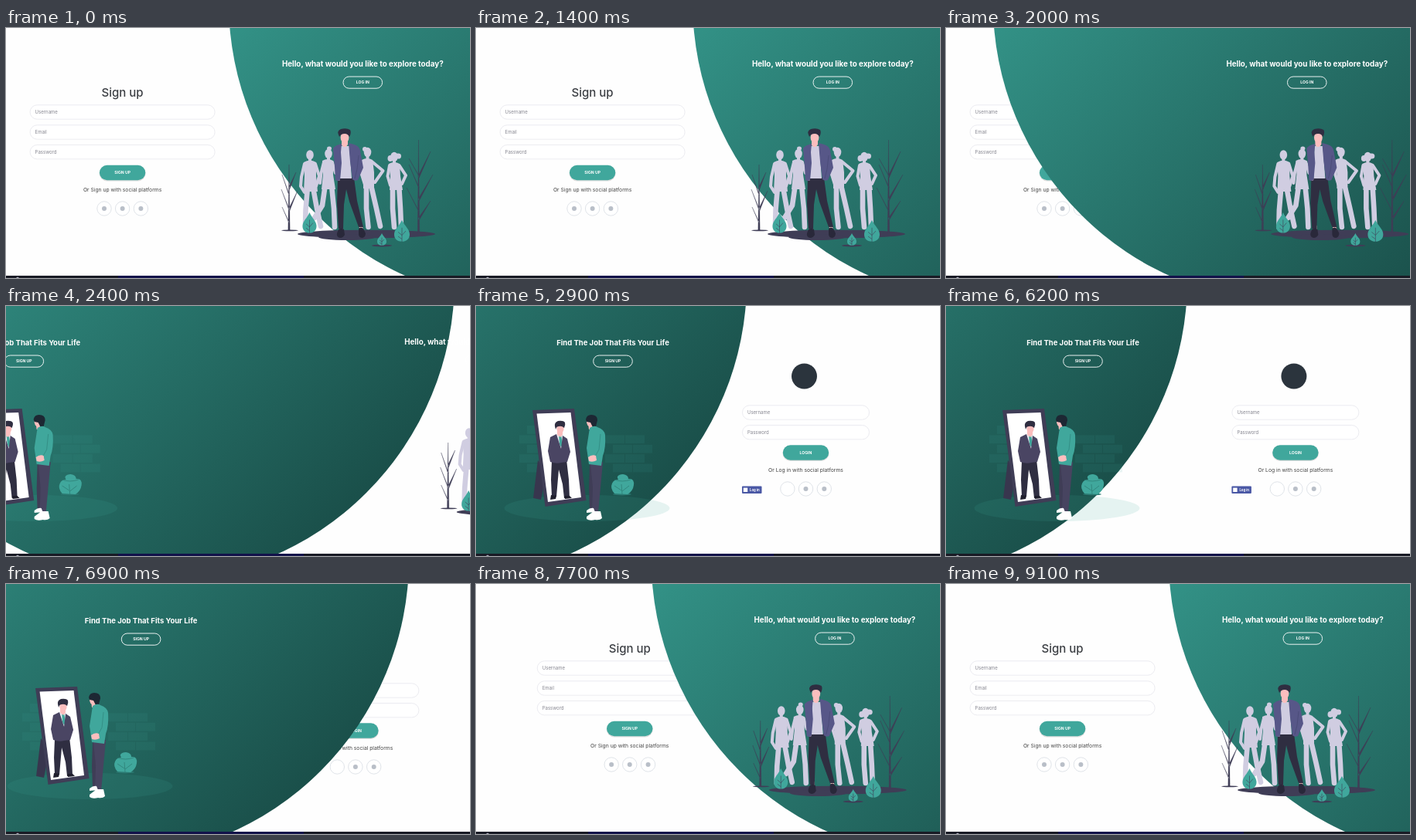
Animation of 600x324 px, one loop 9200 ms. Source, as an HTML page:

```html
<!DOCTYPE html>
<html lang="en">
<head>
<meta charset="utf-8">
<title>Sign up and log in</title>
<style>
html, body { margin: 0; width: 100%; height: 100%; overflow: hidden; background: #fefefe; }
svg { display: block; width: 100vw; height: 100vh; }
text { font-family: Inter, "Open Sans", sans-serif; }
.title { font-size: 15px; font-weight: 450; fill: #3c3f44; }
.head { font-size: 9.8px; font-weight: 700; fill: #fff; }
.btn { font-size: 5.1px; font-weight: 700; fill: #fff; }
.hint { font-size: 6px; fill: #85858f; }
.note { font-size: 6.75px; fill: #444; }
.title, .head, .btn, .note { text-anchor: middle; }
.dark { fill: #3f3d56; }
.ink { fill: #2f2e41; }
.pale { fill: #d0cde1; }
.limb { fill: none; stroke: #d0cde1; stroke-linecap: round; stroke-linejoin: round; }
.teal { fill: #40a79c; }
.skin { fill: #fbbebe; }
.white { fill: #fff; }
</style>
</head>
<body>
<svg id="stage" viewBox="0 0 600 324" preserveAspectRatio="none"></svg>
<script>
const pill = (x, y, w, h, attrs) =>
  `<rect x="${x}" y="${y}" width="${w}" height="${h}" rx="${h / 2}" ${attrs}/>`;
const oval = (x, y, rx, ry, attrs = '') =>
  `<ellipse cx="${x}" cy="${y}" rx="${rx}" ry="${ry}" ${attrs}/>`;
const path = (d, attrs = '') => `<path d="${d}" ${attrs}/>`;
const text = (x, y, cls, str, extra = '') => `<text x="${x}" y="${y}" class="${cls}" ${extra}>${str}</text>`;

// Form parts are laid out around x = 0.
const box = (y, w, id = '') =>
  pill(-w / 2, y - 9.2, w, 18.4, `fill="#fff" stroke="#ececf1" ${id}`);
const field = (y, w, label) => box(y, w) + text(6.5 - w / 2, y + 2.1, 'hint', label);
const button = (y, label) =>
  pill(-30, y - 9, 60, 20, 'fill="#000" opacity=".13"') +
  pill(-29.7, y - 9.7, 59.4, 19.4, 'class="teal"') + text(0, y + 1.6, 'btn', label);
const social = (y, marks) => [-23.6, 0, 23.8].map((x, i) =>
  oval(x, y, 9.2, 9.2, 'fill="#fff" stroke="#dce0e6" stroke-width=".9"') +
  (marks[i] ? oval(x, y, 3, 3, 'fill="#b9bfc8"') : '')).join('');
const outlined = (x, y, label) =>
  pill(x - 25.3, y - 7.6, 50.6, 15.2, 'fill="none" stroke="#fff" stroke-width=".9"') +
  text(x, y + 1.7, 'btn', label);

const signUp =
  text(0, 88.8, 'title', 'Sign up') +
  field(109, 239, 'Username') + field(135, 239, 'Email') + field(160.7, 239, 'Password') +
  button(187.5, 'SIGN UP') + text(0, 211.8, 'note', 'Or Sign up with social platforms') +
  social(234, [1, 1, 1]);

const logIn =
  oval(-2, 91, 16.5, 16.5, 'fill="#2b343d"') +
  field(138, 164, 'Username') + box(163.7, 164, 'id="pass"') +
  '<rect id="gap" x="-77.5" y="152" width="25" height="5" fill="#fefefe"/>' +
  text(-75.5, 165.8, 'hint', 'Password', 'id="label"') +
  button(190, 'LOGIN') + text(0, 214.8, 'note', 'Or Log in with social platforms') +
  social(237, [0, 1, 1]) +
  '<rect x="-82.5" y="233.6" width="25.5" height="9.4" rx="1" fill="#4a58a5"/>' +
  '<rect x="-80.7" y="235.6" width="5.4" height="5.4" fill="#fff"/>' +
  text(-66.2, 240, 'btn', 'Log in', 'style="font-size:4.3px"');

// A bare tree: slim trunk plus branches given as [tipX, tipY, rootY].
const tree = (x, top, base, branches) => path(
  `M${x - 1.2} ${base}L${x} ${top}L${x + 1.2} ${base}z` +
  branches.map(([tx, ty, ry]) => `M${tx} ${ty}L${x - .8} ${ry}L${x + .8} ${ry + 2}z`).join(''),
  'class="dark" stroke="#3f3d56" stroke-width=".3"');
const leaf = (x, top, w, h) => path(
  `M${x} ${top}C${x + w * .2} ${top + h * .3} ${x + w / 2} ${top + h * .42} ${x + w / 2} ${top + h * .67}` +
  `C${x + w / 2} ${top + h * 1.1} ${x - w / 2} ${top + h * 1.1} ${x - w / 2} ${top + h * .67}` +
  `C${x - w / 2} ${top + h * .42} ${x - w * .2} ${top + h * .3} ${x} ${top}z`, 'class="teal"') +
  path(`M${x} ${top + h * .35}V${top + h}M${x - w * .25} ${top + h * .55}L${x} ${top + h * .7}` +
  `L${x + w * .25} ${top + h * .5}M${x - w * .25} ${top + h * .75}L${x} ${top + h * .88}`,
  'fill="none" stroke="#3f3d56" stroke-width=".6"');

// A plain standing silhouette: head, torso outline, arm lines, leg lines.
const figure = (x, y, torso, arms, legs) =>
  oval(x, y, 4.8, 6.2, 'class="pale"') + path(torso, 'class="pale"') +
  path(`M${x} ${y}v10${arms}`, 'class="limb" stroke-width="4"') +
  path(legs, 'class="limb" stroke-width="6.6"');

const crowd =
  oval(466, 267, 89, 5.3, 'class="dark"') + oval(441, 271, 37, 4, 'class="dark"') +
  oval(367, 262.3, 11, .9, 'class="dark"') + oval(486, 282, 13, 1.4, 'class="dark"') +
  tree(366, 177, 262, [[357, 190, 215], [375, 187, 207], [356, 209, 234], [377, 211, 235], [357, 232, 251]]) +
  tree(533.5, 145, 265, [[549, 160, 192], [521, 177, 205], [552, 190, 222], [518, 207, 236],
    [549, 224, 247], [521, 169, 190]]) +
  figure(393, 164.5, 'M385 174q8-5 16 0l0 18 2 20h-18l1-20z',
    'M386 176L382 193 381 205 386 213M400 176L405 192 401 205',
    'M389.500 212L387.500 236 387 258M398 212L402 234 407 257') +
  oval(418, 156, 3, 2.6, 'class="pale"') +
  figure(417, 163, 'M409 172q7-4 14 0l0 18 3 19h-18l2-19z',
    'M411 174L407.500 188 406 201M422 174L426 188',
    'M412 209L409 230 399 246M421.500 209L424 234 425 258') +
  oval(464, 157, 3, 3, 'class="pale"') +
  figure(467.5, 161, 'M460 171q7-4 14 0l2 16 0 21h-14l0-20z',
    'M462 173L460 190 464 203M473 173L487.500 185 477 200',
    'M466 208L466 234 468.500 258M473 208L479 234 484 257') +
  oval(497, 169, 3.5, 4, 'class="pale"') + oval(507, 166, 4, 3.6, 'class="pale"') +
  figure(502, 167, 'M495 176q7-4 14 0l1 16 3 18h-17l1-18z',
    'M496 178L493.500 192 497 204M508.500 178L517 191 512 202',
    'M500 210L500 234 502 258M508.500 210L510 234 511 258') +
  path('M432 256h4v7h-4zM456 256l4-1 2 6-4 1z', 'class="skin"') +
  path('M429 194h21l4 30 8 34h-6l-12-33-4-16-3 20-1 31h-6l-2-33z', 'class="ink"') +
  path('M430 261q4-3 7 0l1 7q-2 4-6 4-5-1-4-6zM456 260q3-3 6 0l3 6q0 5-4 6-5 0-5-5z', 'fill="#29283a"') +
  oval(430, 196, 2, 2, 'class="skin"') + oval(451, 195, 2, 2, 'class="skin"') +
  path('M433 153h11l3 42h-15z', 'class="pale"') +
  path('M434 145h8v6q-3 6-8 1z', 'class="skin"') +
  path('M434 150q-9 2-11 6l2 24 1 17q3 2 6 0l2-22-1-14zM443 149l7 2q7 2 8 8l4 22-7 16q-4 2-7-1l-3-23z', 'fill="#575788"') +
  path('M456 165l-2 18-3 12', 'fill="none" stroke="#474873" stroke-width=".7"') +
  oval(438, 142, 5.4, 7, 'class="skin"') +
  path('M431 141q-4-8 2-10 7-2 12 1 2 4-1 9-2-4-6-4-5 0-7 4z', 'class="ink"') +
  leaf(392.5, 239, 18, 27) + leaf(512, 249, 20, 28) + leaf(486, 266, 12, 16);

let bricks = '';
for (let row = 0; row < 5; row++)
  for (const x of [66, 92, 177, 203])
    if (row || x < 177)
      bricks += `<rect x="${x - row % 2 * 10}" y="${155 + row * 12.4}" width="25" height="10.8"/>`;

const mirror =
  oval(143.5, 262, 107, 17, 'fill="#40a79c" opacity=".13"') +
  `<g fill="#40a79c" opacity=".1">${bricks}</g>` +
  path('M80 200L74 249 84 251 91 215z', 'fill="#38364e"') +
  path('M73 135L127 133 142.5 252 89.500 260z', 'class="dark"') +
  path('M78.500 139.500L122.500 138 136 248 93 254z', 'class="white"') +
  path('M98 200l-1 25 1 22h6l3-35 5 19 2 18h7l-1-24-3-26z', 'class="ink"') +
  path('M97 245l7 1-1 4-7 1zM114 246h7l3 3-9 1z', 'fill="#1f1e2c"') +
  path('M103 167h10l1 18h-7z', 'fill="#eef0f5"') +
  path('M107 167h3l2 12-2 4-2-4z', 'class="teal"') +
  path('M104 166l-8 4-3 18 3 14q8 3 14 1l8-1 4-13-4-17-6-4-2 17z', 'fill="#4a4563"') +
  path('M105 161h7v6l-3 3-4-3z', 'class="skin"') + oval(109, 159, 4.6, 6, 'class="skin"') +
  path('M102 156q-1-5 4-7 7-1 9 2 1 3-1 7-3-3-7-2-3 0-4 4z', 'class="ink"') +
  path('M147 203l-1 33 1 28h6l5-30 3-13 3-19z', 'class="dark"') +
  path('M148 205l3 30-1 33h8l3-33 3-32z', 'fill="#474460"') +
  path('M143 265q5-4 9-3l2 5-11 1zM143 273q6-5 10-7l8 0 2 9q-3 3-9 2-7 2-11-1z', 'class="white"') +
  path('M145 152h9v8h-8z', 'class="skin"') + oval(147, 150, 4, 6, 'class="skin"') +
  path('M142 147q1-6 7-6 8 0 8 7l-2 8-4 1-3-6-5-1z', 'fill="#1d2733"') +
  path('M147 158q6-4 10-1 9 3 10 10 1 17-3 27l-2 13-16-2-3-21z', 'class="teal"') +
  path('M161 166l-2 20-5 9', 'fill="none" stroke="#328a81" stroke-width=".8"') +
  path('M145 196q5-4 10-2l1 6q-5 3-10 1z', 'class="skin"') +
  oval(189, 244, 12, 1.5, 'fill="#2b7a72"') +
  path('M179 243q-6-7-3-13 2-5 8-5-4-6 6-7 7 1 7 6 8-1 7 8-1 8-8 12z', 'class="teal"') +
  path('M189 244l-1-13M189 240l9-7M188 239l-9-6M179 225q10 4 21 0', 'fill="none" stroke="#2b7a72" stroke-width=".7"');

document.getElementById('stage').innerHTML =
  `<defs><linearGradient id="shade" x1="0" y1="0" x2="1" y2="1">
    <stop stop-color="#3eb0a2"/><stop offset="1" stop-color="#143f3b"/></linearGradient></defs>
  <g id="up">${signUp}</g><g id="in">${logIn}</g>
  <circle id="disc" cy="-33" r="389" fill="url(#shade)"/>
  <g id="mirror">${mirror}</g>
  <g id="find">${text(177, 51.3, 'head', 'Find The Job That Fits Your Life', 'style="font-size:9.5px"')}${outlined(177, 71.6, 'SIGN UP')}</g>
  <g id="crowd">${crowd}</g>
  <g id="hello">${text(461.3, 50.3, 'head', 'Hello, what would you like to explore today?')}${outlined(461.3, 70.6, 'LOG IN')}</g>
  <rect y="321" width="600" height="3" fill="#191b25"/>
  <rect x="145" y="321" width="240" height="3" fill="#12124a"/>
  <circle cx="15" cy="324.500" r="1.8" fill="#aab"/>`;

const el = id => document.getElementById(id);
const clamp = v => Math.min(1, Math.max(0, v));

// cubic-bezier(.42, 0, .58, 1)
function ease(x) {
  if (x <= 0 || x >= 1) return clamp(x);
  let lo = 0, hi = 1;
  for (let i = 0; i < 24; i++) {
    const s = (lo + hi) / 2, r = 1 - s;
    if (1.26 * s * r * r + 1.74 * s * s * r + s * s * s < x) lo = s; else hi = s;
  }
  return lo * lo * (3 - 2 * lo);
}

function draw(t) {
  const toLogin = (t - 1257) * .922, toSignUp = (t - 6230) * .98;
  // 0 = sign up view, 1 = log in view
  const view = (delay, dur) => ease((toLogin - delay) / dur) - ease((toSignUp - delay) / dur);
  const move = (id, x) => el(id).setAttribute('transform', `translate(${x} 0)`);

  el('disc').setAttribute('cx', 677 - 754 * view(0, 1800));
  const image = view(400, 1100), words = view(600, 900), form = view(718, 1000), fade = view(700, 200);
  move('mirror', 312 * (image - 1));
  move('find', 312 * (words - 1));
  move('crowd', 312 * image);
  move('hello', 312 * words);
  for (const id of ['up', 'in']) move(id, 150.6 + 301.3 * form);
  el('up').setAttribute('opacity', 1 - fade);
  el('in').setAttribute('opacity', fade);

  const focus = clamp((t - 4300) / 200) - clamp((t - 5600) / 200);
  const label = el('label');
  label.setAttribute('y', 165.8 - 9.6 * focus);
  label.style.fontSize = 6 - 1.5 * focus + 'px';
  label.style.fill = focus > .5 ? '#555' : '';
  el('gap').setAttribute('opacity', focus > .5 ? 1 : 0);
  el('pass').setAttribute('stroke', focus > 0 ? '#353b48' : '#ececf1');
  el('pass').setAttribute('stroke-width', 1 + .2 * focus);
}

const start = performance.now();
function tick() {
  const t = (performance.now() - start) % 9200;
  draw(Math.floor(t / 100) * 100);
  requestAnimationFrame(tick);
}
tick();
</script>
</body>
</html>
```
